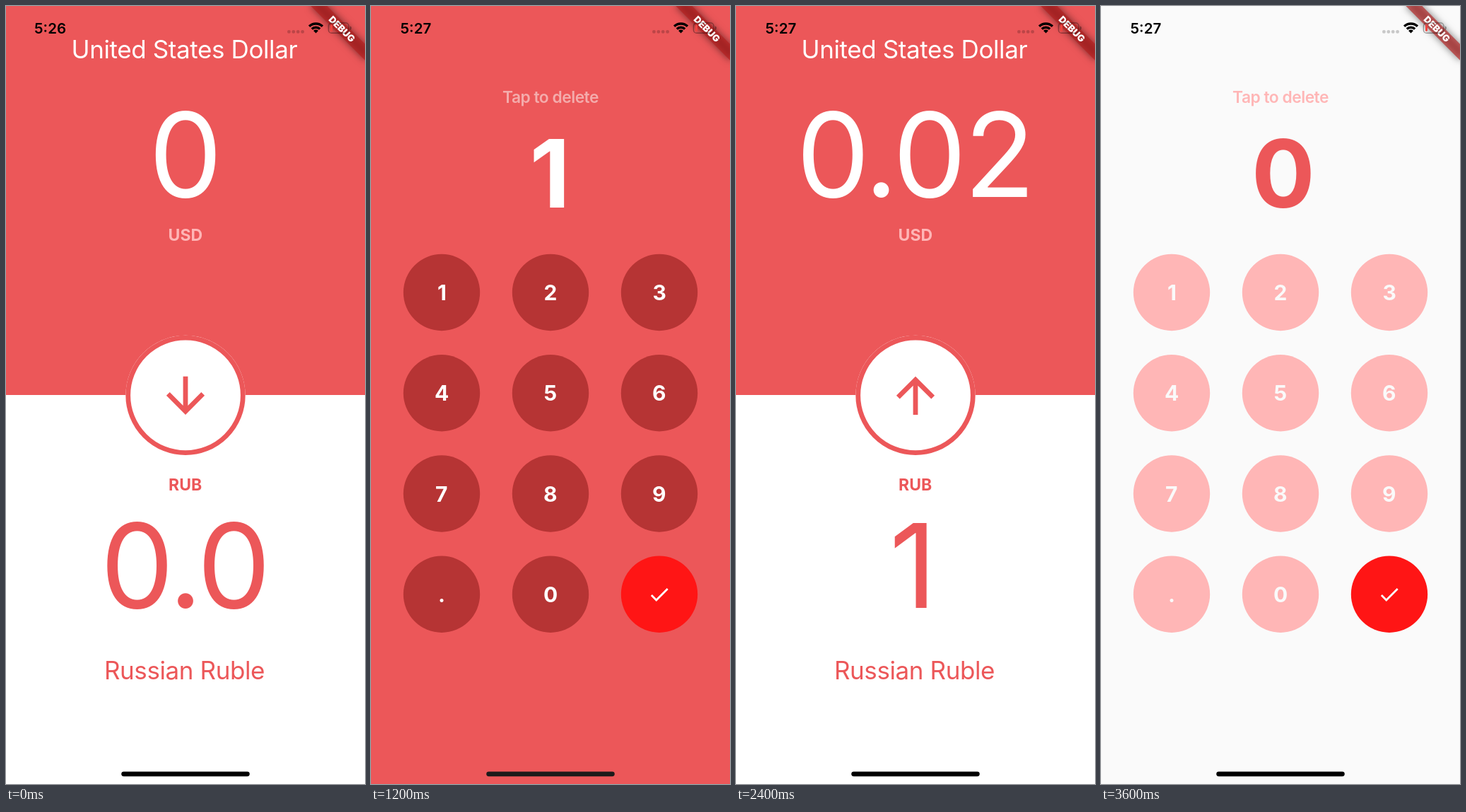
These frames come from a looping animation (508x1100 px, 4200 ms). An HTML page with a canvas:

```html
<!DOCTYPE html>
<html lang="en">
<head>
<meta charset="utf-8">
<title>Currency converter</title>
<style>
html, body { margin: 0; width: 100%; height: 100%; overflow: hidden; }
canvas { display: block; }
</style>
</head>
<body>
<canvas id="stage" width="508" height="1100"></canvas>
<script>
const ctx = document.getElementById('stage').getContext('2d');
const W = 508, H = 1100, HOLD = 600;
const U = W / 375; // one logical phone pixel
const RED = '#ec5759', PINK = '#ffb6b6', WHITE = '#fff';

const ARROW = new Path2D('M20 12l-1.41-1.41L13 16.17V4h-2v12.17l-5.58-5.59L4 12l8 8 8-8z');
const CHECK = new Path2D('M9 16.17L4.83 12l-1.42 1.41L9 19 21 7l-1.41-1.41z');

const THEMES = {
  dark: { bg: RED, key: '#b63434', digit: WHITE, amount: WHITE, hint: '#f4acac', bar: '#1d1a1a' },
  light: { bg: '#fafafa', key: PINK, digit: '#fafafa', amount: RED, hint: PINK, bar: '#000' }
};

const SCENES = [
  () => home('5:26', '0', '0.0', true),
  () => keypad('5:26', '0', THEMES.dark),
  () => keypad('5:27', '1', THEMES.dark),
  () => home('5:27', '1', '65.0', true),
  () => home('5:27', '0.02', '1', false),
  () => keypad('5:27', '1', THEMES.light),
  () => keypad('5:27', '0', THEMES.light)
];

function rect(x, y, w, h, color) {
  ctx.fillStyle = color;
  ctx.fillRect(x, y, w, h);
}

function pill(x, y, w, h, r, color) {
  ctx.fillStyle = color;
  ctx.beginPath();
  ctx.roundRect(x, y, w, h, r);
  ctx.fill();
}

function disc(x, y, r, color) {
  ctx.fillStyle = color;
  ctx.beginPath();
  ctx.arc(x, y, r, 0, 2 * Math.PI);
  ctx.fill();
}

// Centres the visible ink of the text on x.
function text(str, x, baseline, size, weight, color, spacing = 0) {
  ctx.font = `${weight} ${size}px Inter, Roboto, sans-serif`;
  ctx.letterSpacing = spacing + 'px';
  ctx.fillStyle = color;
  const m = ctx.measureText(str);
  ctx.fillText(str, x + (m.actualBoundingBoxLeft - m.actualBoundingBoxRight) / 2, baseline);
}

function icon(path, x, y, size, color, flip = 1) {
  ctx.save();
  ctx.translate(x, y);
  ctx.scale(size / 24, flip * size / 24);
  ctx.translate(-12, -12);
  ctx.fillStyle = color;
  ctx.fill(path);
  ctx.restore();
}

function banner() {
  const half = 40 * U, top = 28 * U, height = 12 * U;
  ctx.save();
  ctx.translate(W, 0);
  ctx.rotate(Math.PI / 4);
  // Only the shadow of this far-away box falls on the stage.
  ctx.save();
  ctx.shadowColor = 'rgba(0,0,0,.5)';
  ctx.shadowBlur = 10.7;
  ctx.shadowOffsetX = 2000 * Math.SQRT1_2;
  ctx.shadowOffsetY = 2000 * Math.SQRT1_2;
  rect(-half - 2000, top, 2 * half, height, '#000');
  ctx.restore();
  rect(-half, top, 2 * half, height, 'rgba(183,28,28,.627)');
  text('DEBUG', 0, top + height / 2 + 4.7, 13.2, 900, WHITE);
  ctx.restore();
}

function wifi(x, y) {
  const mid = -Math.PI / 2, spread = 0.76;
  ctx.fillStyle = '#000';
  for (const [inner, outer] of [[0, 5], [6.7, 10], [11.9, 15.4]]) {
    ctx.beginPath();
    ctx.arc(x, y, outer, mid - spread, mid + spread);
    ctx.arc(x, y, inner, mid + spread, mid - spread, true);
    ctx.fill();
  }
}

function statusBar(time) {
  text(time, time === '5:26' ? 63 : 63.5, 38.5, 20.5, 600, '#000');
  for (let i = 0; i < 4; i++) disc(400.4 + i * 6.4, 36.4, 2.4, 'rgba(0,0,0,.2)');
  wifi(438.5, 38.6);
  ctx.strokeStyle = 'rgba(0,0,0,.35)';
  ctx.lineWidth = 1.4;
  ctx.beginPath();
  ctx.roundRect(456.4, 23.9, 28.6, 14.4, 4.4);
  ctx.stroke();
  pill(486.8, 28.5, 1.8, 5.4, [0, 2, 2, 0], 'rgba(0,0,0,.4)');
  pill(459, 26.4, 3, 9.4, 1.4, '#f0443f');
}

function chrome(time, barColor) {
  banner();
  statusBar(time);
  pill(W / 2 - 67 * U, H - 13 * U, 134 * U, 5 * U, 2.5 * U, barColor);
}

// The lone "1" sits left of centre because of its wide side bearing.
function bigAmount(str, baseline, color) {
  text(str, str === '1' ? 247 : str.length > 3 ? 253 : 254, baseline, 165, 400, color, -3.2);
}

function home(time, usd, rub, down) {
  rect(0, 0, W, H, WHITE);
  rect(0, 0, W, 550, RED);
  text('United States Dollar', 254, 73.5, 35, 400, WHITE, -0.4);
  bigAmount(usd, 270, WHITE);
  text('USD', 254, 332, 23, 700, PINK);

  const y = 550.4, r = 62.5 * U, border = 5 * U;
  disc(254, y, r, WHITE);
  ctx.strokeStyle = RED;
  ctx.lineWidth = border;
  ctx.beginPath();
  ctx.arc(254, y, r - border / 2, 0, 2 * Math.PI);
  ctx.stroke();
  icon(ARROW, 254, y + 0.4, 60 * U, RED, down ? 1 : -1);

  text('RUB', 254, 684.5, 23, 700, RED);
  bigAmount(rub, 851, RED);
  text('Russian Ruble', 253.5, 951.5, 35, 400, RED, -0.4);
  chrome(time, '#000');
}

function keypad(time, amount, theme) {
  rect(0, 0, W, H, theme.bg);
  text('Tap to delete', 254, 137, 22.8, 600, theme.hint, -0.5);
  text(amount, amount === '1' ? 252 : 258, 285, 133, 700, theme.amount);
  [...'123456789.0✓'].forEach((label, i) => {
    const x = 100 + (i % 3) * 154, y = 405 + Math.floor(i / 3) * 142.25;
    const done = label === '✓';
    disc(x, y, 40 * U, done ? '#ff1515' : theme.key);
    if (done) icon(CHECK, x, y + 0.3, 25 * U, theme.digit);
    else text(label, x, y + 11, 30, 700, theme.digit);
  });
  chrome(time, theme.bar);
}

function frame(now) {
  SCENES[Math.floor(now / HOLD) % SCENES.length]();
  requestAnimationFrame(frame);
}
frame(performance.now());
</script>
</body>
</html>
```
